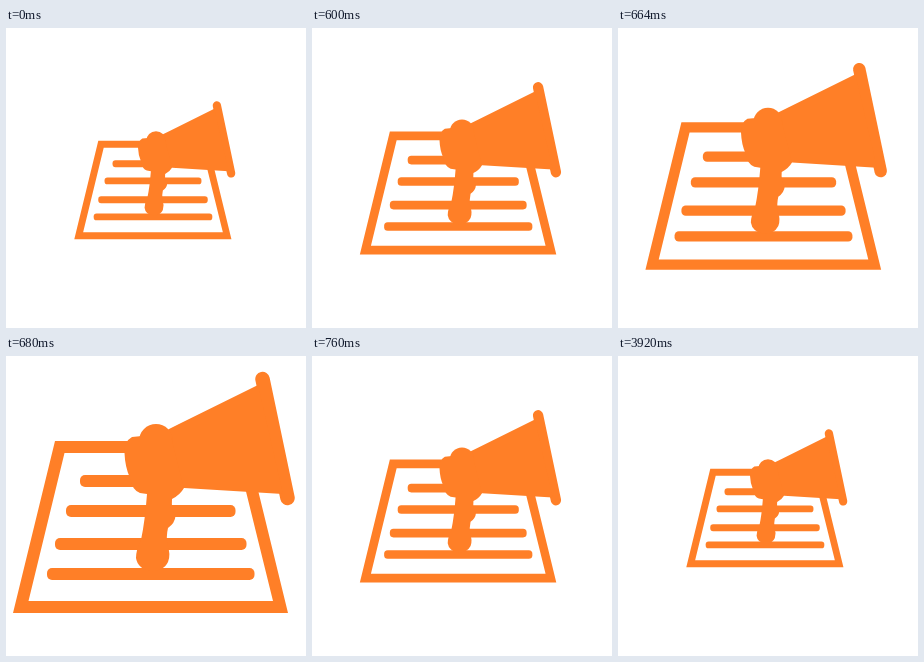
Animation, 300 px wide and 300 px high, one loop 6 s. Source, as an HTML page:

```html
<!DOCTYPE html>
<html lang="en">
<head>
<meta charset="utf-8">
<title>Announcement icon</title>
<style>
  html, body { margin: 0; width: 100%; height: 100%; overflow: hidden; background: #fff; }
  svg { display: block; width: 100vw; height: 100vh; }
</style>
</head>
<body>
<svg viewBox="0 0 300 300">
  <g id="icon" fill="#ff7f27">
    <!-- sheet -->
    <path fill-rule="evenodd" d="M49 85H240L282 257H7ZM58.5 97L22.5 245H267L230.500 97Z"/>
    <rect x="74" y="119" width="80" height="12" rx="5"/>
    <rect x="60" y="149" width="169.500" height="12" rx="5"/>
    <rect x="49" y="182" width="191.500" height="12" rx="5"/>
    <rect x="41" y="212" width="207.500" height="12" rx="5"/>
    <!-- megaphone -->
    <path d="M256.500 23L281.500 142" stroke="#ff7f27" stroke-width="14.500" stroke-linecap="round"/>
    <path d="M163 73L173 68L252 29L277 138L178 132L140 130V90Z"/>
    <circle cx="150" cy="85" r="17"/>
    <path d="M136 80L126 81Q118.500 85 118.500 97Q119 111 124 122Q126 134 134 137L141 138
             Q139 165 135 184Q130 194 130 202A16.700 15 0 0 0 162 206Q165 198 161.500 190
             Q160 180 162 172Q169 167 169.500 160Q165 154 166 143Q174 139 178 132L165 80Z"/>
  </g>
</svg>
<script>
  const icon = document.getElementById('icon');
  const LOOP = 6000, START = 600, STEP = 40, PEAK = 3;

  // Size grows by a seventh per step up to the peak, then shrinks back.
  function draw(ms) {
    const t = ms % LOOP;
    const step = Math.floor((t - START) / STEP) + 1;
    const level = Math.max(0, PEAK - Math.abs(step - PEAK));
    const scale = (4 + level) / 7;
    icon.setAttribute('transform', `translate(150 150) scale(${scale}) translate(-150 -150)`);
  }

  let begin = null;
  function tick(now) {
    if (begin === null) begin = now;
    draw(now - begin);
    requestAnimationFrame(tick);
  }
  draw(0);
  requestAnimationFrame(tick);
</script>
</body>
</html>
```
